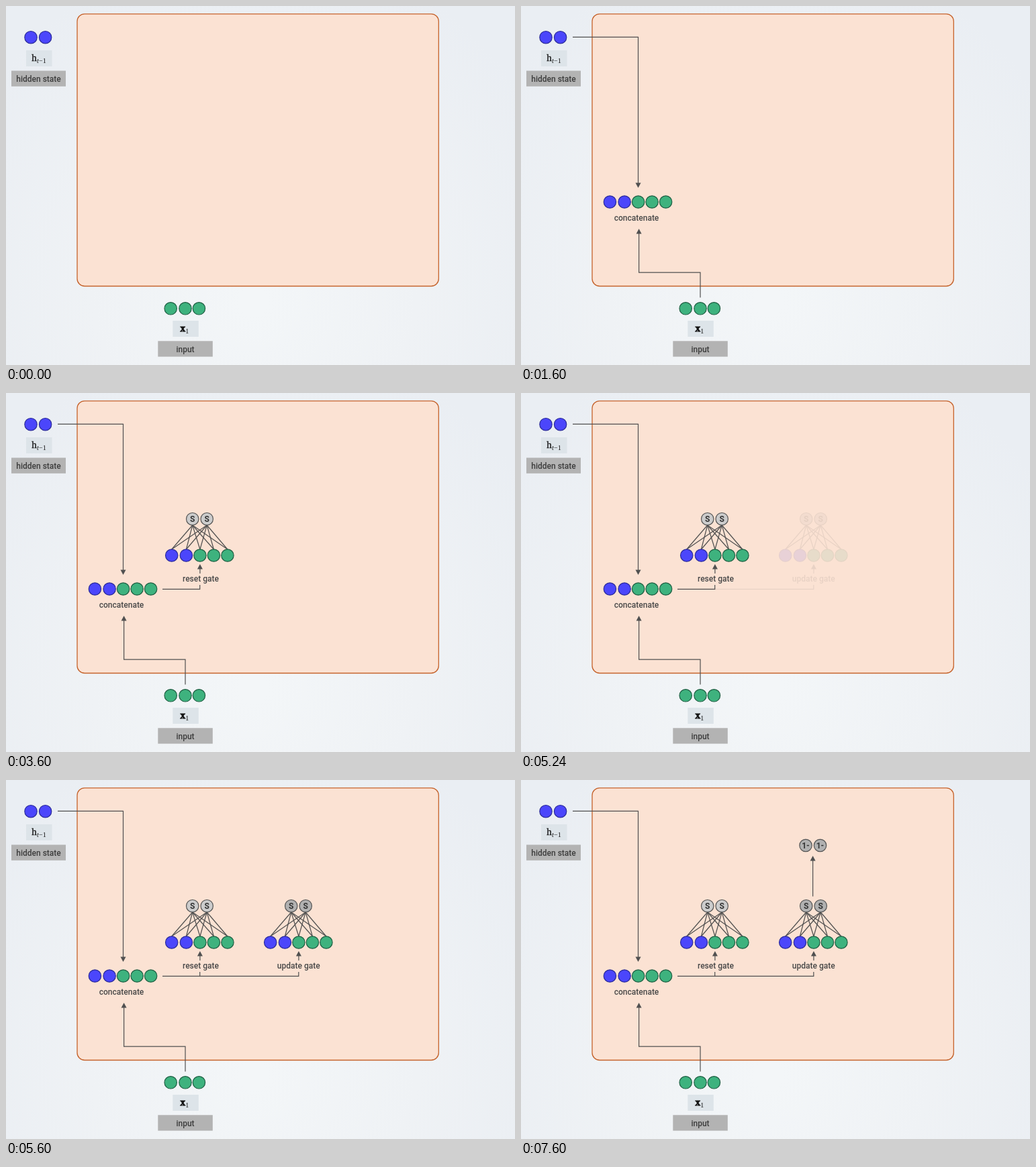
Write an HTML page with a canvas that moves like this. It is 758x535 px and loops after 8000 ms.

```html
<!DOCTYPE html>
<html lang="en">
<head>
<meta charset="utf-8">
<title>Recurrent cell with gates</title>
<style>
html, body { margin: 0; width: 100%; height: 100%; overflow: hidden; background: #ebeff3; }
canvas { display: block; }
</style>
</head>
<body>
<canvas id="stage" width="758" height="535"></canvas>
<script>
const W = 758, H = 535, LOOP = 8000, STEP = 40, STEPS = 10;
const BLUE = ['#4b46fb', '#2b2b9a'];
const GREEN = ['#3eb27e', '#1f5f43'];
const LIGHT = ['#cccccc', '#555555'];
const DARK = ['#b1b1b1', '#555555'];
const LINE = '#505050';
const SANS = 'Roboto, sans-serif';
const SERIF = '"Liberation Serif", serif';

const stage = document.getElementById('stage').getContext('2d');
let c;

function layer(draw) {
  const canvas = document.createElement('canvas');
  canvas.width = W;
  canvas.height = H;
  c = canvas.getContext('2d');
  draw();
  return canvas;
}

function text(str, x, y, font = '500 12px ' + SANS, color = '#484848', align = 'center') {
  c.font = font;
  c.fillStyle = color;
  c.textAlign = align;
  c.fillText(str, x, y);
}

function box(x, y, w, h, color) {
  c.fillStyle = color;
  c.fillRect(x, y, w, h);
}

function dot(x, y, [fill, edge], label) {
  c.beginPath();
  c.arc(x, y, 9.2, 0, Math.PI * 2);
  c.fillStyle = fill;
  c.fill();
  c.strokeStyle = edge;
  c.lineWidth = 1.2;
  c.stroke();
  if (label) text(label, x, y + 4, 'bold 12px ' + SANS, '#333');
}

function line(...pts) {
  c.beginPath();
  for (let i = 0; i < pts.length; i += 2) c.lineTo(pts[i], pts[i + 1]);
  c.strokeStyle = LINE;
  c.lineWidth = 1.2;
  c.stroke();
}

// dir: 1 points down, -1 points up
function head(x, tip, dir) {
  c.beginPath();
  c.moveTo(x, tip);
  c.lineTo(x - 4, tip - 7.5 * dir);
  c.lineTo(x + 4, tip - 7.5 * dir);
  c.closePath();
  c.fillStyle = LINE;
  c.fill();
}

const fiveX = x => [0, 21.7, 42.2, 62.7, 83.2].map(d => x + d);
const kind = i => i < 2 ? BLUE : GREEN;

function gate(x, name, nameX, tone) {
  const inputs = fiveX(x), outputs = [x + 31, x + 52.5], mid = inputs[2];
  for (const o of outputs)
    for (const i of inputs) line(o, 197, i, 233);
  inputs.forEach((i, n) => dot(i, 242, kind(n)));
  outputs.forEach(o => dot(o, 187.7, tone, 'S'));
  line(mid, 269, mid, 261);
  head(mid, 255, -1);
  text(name, nameX, 280.5);
}

function background() {
  box(0, 0, W, H, '#ebeff3');
  const glow = c.createRadialGradient(370, 440, 20, 370, 380, 470);
  glow.addColorStop(0, '#f3f6f8');
  glow.addColorStop(0.5, '#eff2f5');
  glow.addColorStop(1, '#eaeef3');
  box(0, 0, W, H, glow);
}

const base = layer(() => {
  background();
  c.beginPath();
  c.roundRect(106, 11.8, 538.3, 405.7, 11);
  c.fillStyle = '#fbe2d3';
  c.fill();
  c.strokeStyle = '#c5632c';
  c.lineWidth = 1.3;
  c.stroke();

  dot(37, 46.7, BLUE);
  dot(58.6, 46.7, BLUE);
  box(30, 66, 38.5, 24, '#dde4e9');
  text('h', 38.3, 82, '15px ' + SERIF, '#111', 'left');
  c.strokeStyle = '#111';
  c.lineWidth = 0.3;
  c.strokeText('h', 38.3, 82);
  text('t', 46, 85, 'italic 10px ' + SERIF, '#111', 'left');
  text('−1', 49, 85, '10px ' + SERIF, '#111', 'left');
  box(8, 96.5, 81, 23.3, '#b3b3b3');
  text('hidden state', 48.5, 113, undefined, '#3c3c3c');

  for (const x of [245.2, 267, 287.4]) dot(x, 450.8, GREEN);
  box(248.3, 469, 38.5, 24, '#dde4e9');
  text('x', 259.6, 485, '15px ' + SERIF, '#111', 'left');
  c.strokeStyle = '#111';
  c.strokeText('x', 259.6, 485);
  text('1', 267.2, 488, '10px ' + SERIF, '#111', 'left');
  box(226.3, 499.3, 81.5, 23.3, '#b3b3b3');
  text('input', 267, 516, undefined, '#3c3c3c');
});

const parts = [
  [1240, () => {
    line(77, 46.3, 174.5, 46.3, 174.5, 264);
    head(174.5, 271, 1);
    line(267, 434.5, 267, 397.2, 175.6, 397.2, 175.6, 339);
    head(175.6, 332, -1);
    fiveX(132.4).forEach((x, i) => dot(x, 292, kind(i)));
    text('concatenate', 172, 319.5);
  }],
  [3240, () => {
    line(233, 292.3, 288.7, 292.3, 288.7, 286);
    gate(246.7, 'reset gate', 290, LIGHT);
  }],
  [5240, () => {
    line(289, 292.3, 435.8, 292.3, 435.8, 286);
    gate(393.7, 'update gate', 435.8, DARK);
    // the second gate's outputs sit slightly left of the regular spacing
  }],
  [7240, () => {
    line(434.6, 173.5, 434.6, 120);
    head(434.6, 113, -1);
    dot(424, 97.5, DARK, '1-');
    dot(445.5, 97.5, DARK, '1-');
  }]
].map(([start, draw]) => ({ start, image: layer(draw) }));

const begin = performance.now();

function frame(now) {
  const t = Math.max(0, now - begin) % LOOP;
  stage.globalAlpha = 1;
  stage.drawImage(base, 0, 0);
  for (const { start, image } of parts) {
    if (t < start) continue;
    stage.globalAlpha = Math.min(1, (Math.floor((t - start) / STEP) + 1) / STEPS);
    stage.drawImage(image, 0, 0);
  }
  requestAnimationFrame(frame);
}
requestAnimationFrame(frame);
</script>
</body>
</html>
```
